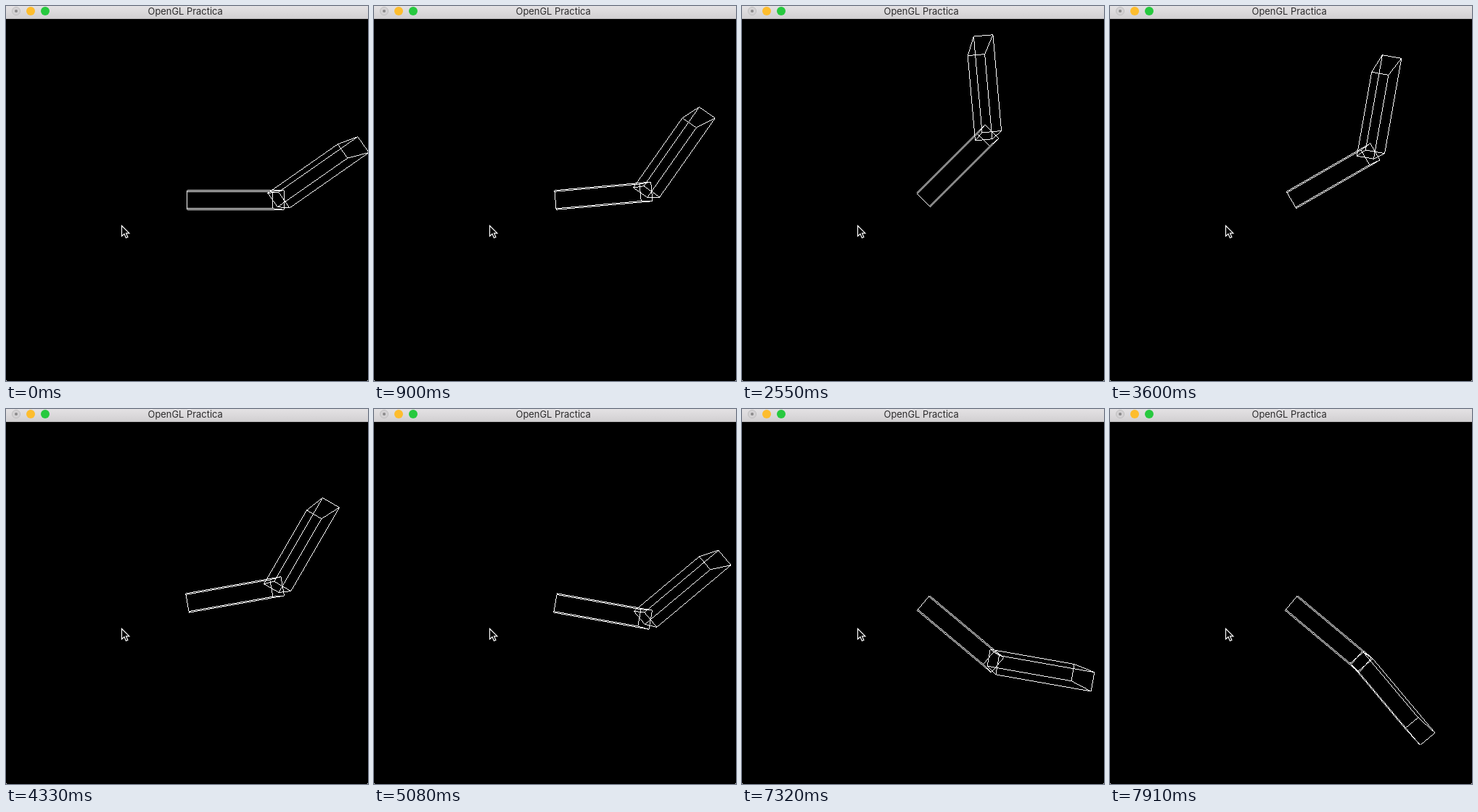
Write an HTML page with a canvas that moves like this. It is 499x518 px and loops after 8000 ms.

```html
<!DOCTYPE html>
<html lang="en">
<head>
<meta charset="utf-8">
<title>OpenGL Practica</title>
<style>
  html, body { margin: 0; width: 100%; height: 100%; overflow: hidden; background: #fff; }
  #win { position: relative; width: 499px; height: 518px; overflow: hidden; background: #000; border-radius: 0 0 3px 3px; }
  canvas, svg { position: absolute; left: 0; top: 0; }
  #bar { position: absolute; left: 0; top: 0; width: 499px; height: 18px; box-sizing: border-box;
         background: linear-gradient(#e4e2e4, #d2d0d2); border-bottom: 1px solid #b8b6b8; }
</style>
</head>
<body>
<div id="win">
  <canvas id="scene" width="499" height="518"></canvas>
  <div id="bar"></div>
  <svg width="499" height="518">
    <circle cx="14" cy="7" r="5.6" fill="#d3d1d3" stroke="#bcbabc" stroke-width=".8"/>
    <circle cx="14" cy="7" r="2" fill="#8b898b"/>
    <circle cx="34" cy="7" r="6" fill="#fdbd2e"/>
    <circle cx="54" cy="7" r="6" fill="#27c93f"/>
    <text x="247.2" y="12" text-anchor="middle" font-family="Inter, Roboto, sans-serif" font-size="12.9" fill="#2c2b2c">OpenGL Practica</text>
    <path d="M159.5 303.5V318L163 314.8L165.4 320.2L167.9 319.2L165.6 313.9H169.9Z" fill="#000" stroke="#fff" stroke-width="1.2"/>
  </svg>
</div>
<script>
const LOOP = 8000, TICK = 149.2;
const STEP = 5;                              // degrees per key press
const PIVOT = { x: 249.98, y: 268 };
const FOCAL = 500, DEPTH = 8;                // camera
const NEAR = FOCAL / (DEPTH - 0.5), FAR = FOCAL / (DEPTH + 0.5);

// Ticks without a key press
const PAUSES = [3, 5, 7, 8, 10, 18, 22, 28, 33, 39, 43, 44, 47, 48];

const ctx = document.getElementById('scene').getContext('2d');

// Number of presses made between two counts
const ramp = (n, from, to) => Math.min(Math.max(n - from, 0), to - from);

function presses(t) {
  const tick = Math.floor(t / TICK);
  return tick - PAUSES.filter(p => p <= tick).length;
}

// Elbow up, shoulder up and down, elbow down (twice as fast at the end)
function pose(n) {
  return {
    shoulder: STEP * (ramp(n, 3, 13) - ramp(n, 13, 31)),
    elbow: 35 + STEP * (ramp(n, 0, 3) - ramp(n, 31, 39) - ramp(n, 35, 39))
  };
}

// Hard-edged one pixel line through the pixel centres it spans
function line([x0, y0], [x1, y1]) {
  const steep = Math.abs(y1 - y0) > Math.abs(x1 - x0);
  let [a, b, c, d] = steep ? [y0, x0, y1, x1] : [x0, y0, x1, y1];
  if (a > c) [a, b, c, d] = [c, d, a, b];
  const slope = (d - b) / (c - a);
  for (let i = Math.ceil(a - 0.5); i + 0.5 < c; i++) {
    const j = Math.floor(b + (i + 0.5 - a) * slope);
    if (steep) ctx.fillRect(j, i, 1, 1);
    else ctx.fillRect(i, j, 1, 1);
  }
}

// Corners of a 2 x 0.4 bar starting at (x, y), on one depth plane
function face(x, y, angle, scale) {
  const c = Math.cos(angle), s = Math.sin(angle);
  return [[0, 0.2], [2, 0.2], [2, -0.2], [0, -0.2]].map(([u, v]) => [
    PIVOT.x + scale * (x + u * c - v * s),
    PIVOT.y - scale * (y + u * s + v * c)
  ]);
}

function box(x, y, angle) {
  const near = face(x, y, angle, NEAR), far = face(x, y, angle, FAR);
  for (let i = 0; i < 4; i++) {
    const next = (i + 1) % 4;
    line(near[i], near[next]);
    line(far[i], far[next]);
    line(near[i], far[i]);
  }
}

function draw(n) {
  const { shoulder, elbow } = pose(n);
  const upper = shoulder * Math.PI / 180;
  const fore = (shoulder + elbow) * Math.PI / 180;
  ctx.fillStyle = '#000';
  ctx.fillRect(0, 0, 499, 518);
  ctx.fillStyle = '#fff';
  box(0, 0, upper);
  box(2 * Math.cos(upper), 2 * Math.sin(upper), fore);
}

const start = performance.now();
let shown = -1;
function frame() {
  const n = presses((performance.now() - start) % LOOP);
  if (n !== shown) draw(shown = n);
  requestAnimationFrame(frame);
}
frame();
</script>
</body>
</html>
```
